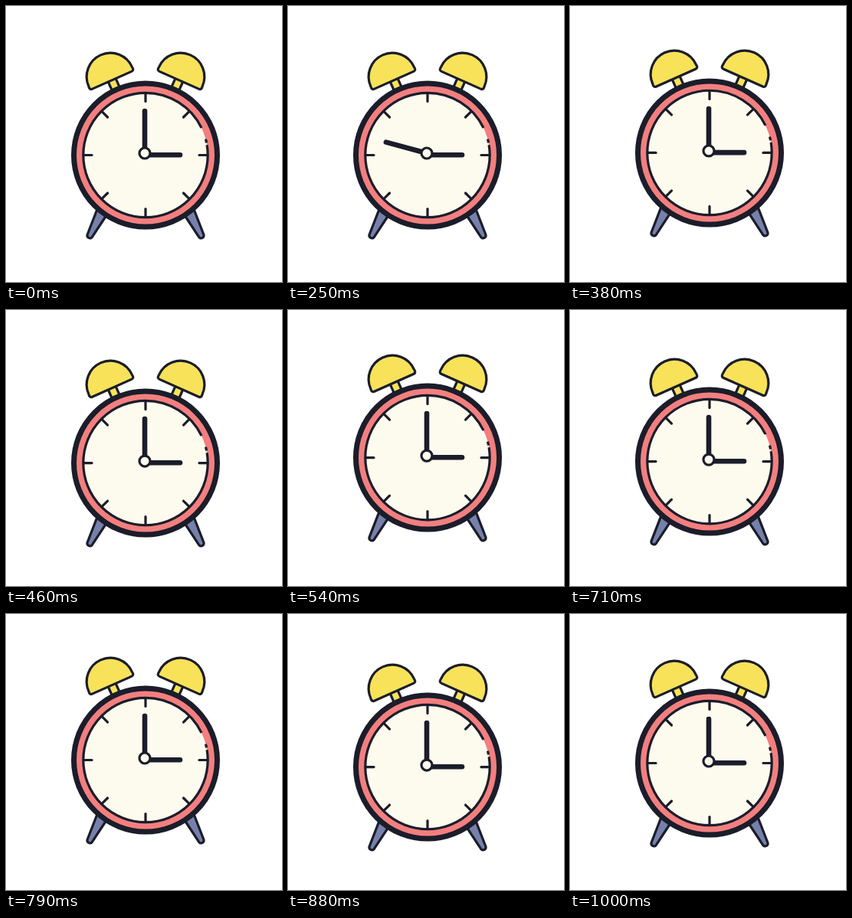
These frames come from a looping animation (360 px wide and 360 px high, 1180 ms). An HTML page:

```html
<!DOCTYPE html>
<html lang="en">
<head>
<meta charset="utf-8">
<title>Alarm clock</title>
<style>
  html, body { margin: 0; width: 100%; height: 100%; overflow: hidden; background: #fff; }
  svg { display: block; width: 100vw; height: 100vh; }
  .line { stroke: #1b1d2a; stroke-width: 3.2; stroke-linejoin: round; }
  .bell { fill: #f7e25a; }
  .leg { fill: #7681ab; }
  .ring { fill: #f37f7f; stroke-width: 7; }
  .face { fill: #fdfbee; }
  .hand { stroke-width: 6.6; stroke-linecap: round; }
  .tick { stroke-linecap: round; }
</style>
</head>
<body>
<svg viewBox="0 0 360 360">
  <defs>
    <g id="side" class="line">
      <path class="leg" d="M119 265L106 298.5A3.6 3.6 0 0 0 112 301.8L131 273Z"/>
      <g class="bell" transform="translate(137 94) rotate(-24)">
        <rect x="-5.4" y="2" width="10.8" height="18"/>
        <path d="M-28 3Q-32 3 -31 -2A31 31 0 0 1 31 -2Q32 3 28 3Z"/>
      </g>
    </g>
    <path id="tick" class="line tick" d="M182 114V124.5"/>
  </defs>
  <g id="clock">
    <use href="#side"/>
    <use href="#side" transform="translate(364 0) scale(-1 1)"/>
    <circle class="line ring" cx="182" cy="194.5" r="93.5"/>
    <!-- the rim line is broken at the upper right -->
    <circle class="line face" cx="182" cy="194.5" r="81.2" pathLength="360"
            stroke-dasharray="334 11 3.5 2 9.5 0"/>
    <g id="ticks"></g>
    <path class="line hand" d="M184 194.2H227"/>
    <path id="minute" class="line hand" d="M181 192V137"/>
    <circle class="line face" cx="181" cy="192" r="7"/>
  </g>
</svg>
<script>
  const LOOP = 1180, FPS = 24, LAST = 24;
  const SPIN = 7.5;   // frames the minute hand turns before the ringing
  const SHAKE = 5;    // frames per shake
  const el = id => document.getElementById(id);

  for (let a = 0; a < 360; a += 45) {
    el('ticks').insertAdjacentHTML('beforeend',
      `<use href="#tick" transform="rotate(${a} 182 194.5)"/>`);
  }

  // Frames begin on whole hundredths of a second
  const frameAt = ms =>
    Math.min(LAST, Math.floor((Math.floor(ms / 10) * 10 + 4.9) * FPS / 1000));

  function angle(k) {
    const u = Math.min(1, k / SPIN);
    return 720 * u * u * (3 - 2 * u);
  }

  function lift(k) {
    if (k < SPIN || k === LAST) return 0;
    const s = -Math.sin(2 * Math.PI * (k - SPIN) / SHAKE);
    const up = k < 13.5 ? 3.2 : 4.2;
    return s * (s < 0 ? up : 5.3);
  }

  function draw(now) {
    const k = frameAt(now % LOOP);
    el('minute').setAttribute('transform', `rotate(${angle(k)} 181 192)`);
    el('clock').setAttribute('transform', `translate(0 ${lift(k)})`);
    requestAnimationFrame(draw);
  }
  draw(performance.now());
</script>
</body>
</html>
```
